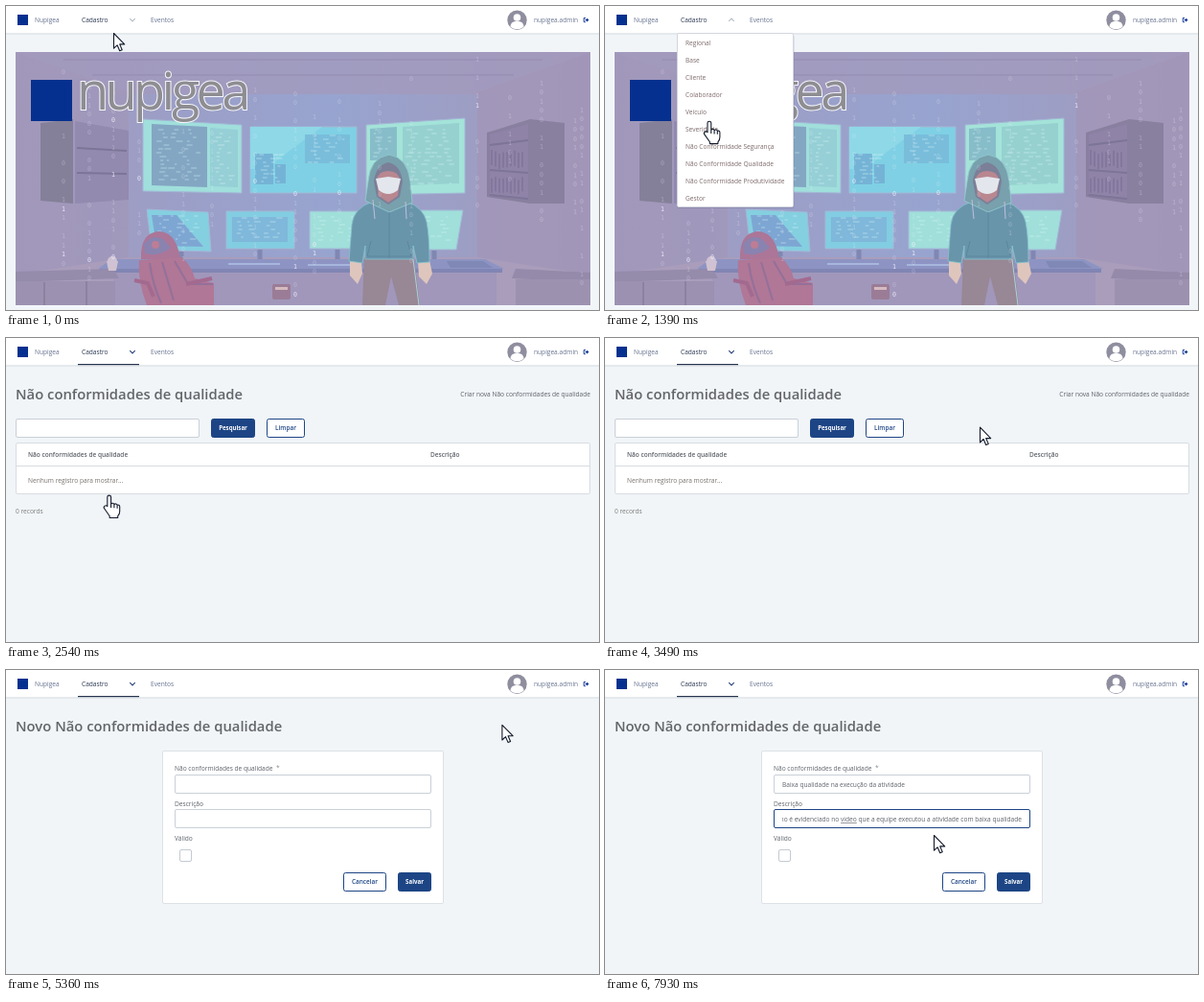
Animation of 619 by 317 pixels, one loop 8000 ms. Source, as an HTML page:

```html
<!DOCTYPE html>
<html lang="pt-BR">
<head>
<meta charset="utf-8">
<title>Cadastro</title>
<style>
  html, body { margin: 0; width: 100%; height: 100%; overflow: hidden; background: #f1f5f8; }
  svg { display: block; width: 619px; height: 317px; font-family: "Open Sans", "Noto Sans", sans-serif; }
  .digits { font-family: "DejaVu Sans Mono", monospace; }
</style>
</head>
<body>
<svg id="stage" viewBox="0 0 619 317"></svg>
<script>
const LOOP = 8000;
const NAVY = '#1d4585', INK = '#5d6269', BRAND = '#06308f';

let seed = 11;
const rnd = () => (seed = (seed * 16807) % 2147483647) / 2147483647;

const attrs = o => Object.entries(o).map(([k, v]) => `${k}="${v}"`).join(' ');
const text = (x, y, s, o = {}) =>
  `<text ${attrs({ x, y, 'font-size': 6.6, fill: INK, ...o })}>${s}</text>`;
const box = (x, y, w, h, fill, o = {}) =>
  `<rect ${attrs({ x, y, width: w, height: h, fill, ...o })}/>`;
const frame = (x, y, w, h, stroke, o = {}) =>
  box(x + .5, y + .5, w - 1, h - 1, '#fff', { stroke, rx: 1.5, ...o });
const poly = (points, fill, o = {}) => `<polygon ${attrs({ points, fill, ...o })}/>`;
const path = (d, o = {}) => `<path ${attrs({ d, fill: 'none', ...o })}/>`;
const group = (id, s, o = {}) => `<g ${attrs({ id, ...o })}>${s}</g>`;
const button = (x, y, w, label, solid) =>
  frame(x, y, w, 20, NAVY, { fill: solid ? NAVY : '#fff', rx: 2 }) +
  text(x + w / 2, y + 12.4, label, {
    'text-anchor': 'middle', 'font-weight': solid ? 700 : 600,
    'font-size': solid ? 6.1 : 6.4, fill: solid ? '#fff' : NAVY
  });
const title = s => text(10, 64, s, { 'font-size': 14.8, 'font-weight': 600, fill: '#636569' });

// Short rows of fake code inside a screen
function codeLines(x, y, w, h) {
  let d = '';
  for (let row = y + 3; row < y + h - 2; row += 4) {
    for (let col = x + 3 + rnd() * 8; col < x + w - 9; col += 6 + rnd() * 18) {
      d += `M${col.toFixed(1)} ${row}h${(2 + rnd() * 5).toFixed(1)}`;
    }
  }
  return path(d, { stroke: '#d9f6f6', 'stroke-width': .9, opacity: .55 });
}

const monitor = (points, fill) =>
  poly(points, fill, { stroke: '#a3b8d6', 'stroke-linejoin': 'round' });

function binaryRain() {
  let s = '';
  for (const x of [58, 85, 110, 137, 183, 213, 258, 300, 320, 346, 388, 421, 490, 524, 557, 592, 599]) {
    const end = 190 + rnd() * 115;
    for (let y = 56 + rnd() * 70; y < end; y += 9.5) {
      if (rnd() < .7) {
        s += text(x, y.toFixed(1), rnd() < .5 ? 0 : 1,
          { opacity: rnd() < .1 ? .9 : .3, fill: '#f0effa' });
      }
    }
  }
  return group('rain', s, { class: 'digits' });
}

function banner() {
  let books = '';
  for (let i = 0; i < 9; i++) books += `M${507 + i * 4} ${150 + rnd() * 5}v16M${507 + i * 4} ${178 + rnd() * 4}v15`;
  return [
    box(10, 48, 600, 264, 'url(#wall)'),
    poly('10,48 610,48 505,92 120,92', '#a39abd', { opacity: .75 }),
    path('M60 56H560M90 72H530', { stroke: '#968eb2', 'stroke-width': 2, opacity: .6 }),
    poly('10,48 128,90 128,262 10,290', '#a198b9', { opacity: .7 }),
    poly('610,48 492,90 492,262 610,290', '#a397b8', { opacity: .8 }),
    poly('10,280 128,262 492,262 610,280 610,312 10,312', '#a99dbb'),
    // shelves
    poly('36,122 70,118 70,206 36,203', '#858099'),
    poly('72,120 128,130 128,202 72,206', '#938ab0'),
    poly('502,132 547,118 583,122 583,206 547,206 502,199', '#897f9f'),
    poly('505,134 545,123 545,202 505,196', '#8f83a8'),
    path('M74 148l52 3M74 174l52 1M505 145l40-5M505 171l40 3M505 197l40 4', { stroke: '#7d7598', 'stroke-width': 2 }),
    path(books, { stroke: '#807499', 'stroke-width': 1.5 }),
    // upper screens
    monitor('143,118 246,124 246,195 143,193', '#a0dfdc'),
    poly('152,123 210,126 210,189 152,187', '#83a6c3'),
    poly('213,127 242,129 242,189 213,188', '#96cfd6'),
    codeLines(154, 126, 54, 60), codeLines(213, 130, 30, 58),
    monitor('255,126 366,126 366,195 255,195', '#7fd0e4'),
    poly('255,126 330,126 270,170 255,170', '#8ed8e7'),
    box(260, 154, 19, 32, '#75b3d6'), box(281, 165, 11, 20, '#75b3d6'), box(312, 134, 47, 30, '#79bddb'),
    codeLines(258, 152, 38, 36), codeLines(312, 132, 48, 34),
    monitor('376,124 479,117 479,195 376,197', '#a4e3d9'),
    poly('380,128 408,126 408,160 380,161', '#87bdc9'), poly('414,126 473,122 473,185 414,187', '#96d1d0'),
    codeLines(380, 126, 28, 34), codeLines(414, 126, 58, 62),
    // lower screens
    monitor('147,212 211,215 214,256 152,254', '#84cfe0'),
    poly('152,218 178,218 206,251 157,250', '#7ea6d3'),
    codeLines(155, 216, 52, 36),
    monitor('230,214 301,214 301,253 230,253', '#82cde1'),
    box(236, 220, 58, 26, '#7fb8da'), codeLines(236, 218, 58, 28),
    monitor('317,214 374,214 374,253 317,253', '#a0dfda'),
    codeLines(320, 217, 50, 32),
    monitor('424,213 477,213 470,254 424,254', '#a0dfda'),
    codeLines(428, 217, 42, 32),
    path('M183 256v9M265 254v11M346 254v11M447 255v10', { stroke: '#8087b2', 'stroke-width': 5 }),
    // desks
    poly('110,264 500,264 520,274 96,274', '#8d94c3'),
    box(98, 274, 420, 4, '#8085b3'), box(112, 278, 400, 34, '#a197bb'),
    path('M232 269h54M315 270h44', { stroke: '#a7b6dc', 'stroke-width': 2 }),
    poly('10,277 112,274 118,284 10,288', '#958bab'), box(10, 287, 104, 25, '#9c91b1'),
    path('M40 288v24M84 287v25', { stroke: '#8c829f', 'stroke-width': 2 }),
    poly('532,274 610,278 610,288 528,284', '#958aaa'), box(532, 285, 78, 27, '#9d91b0'),
    poly('460,266 498,266 508,273 464,273', '#8088b6'),
    poly('105,266 117,266 115,276 107,276', '#d2c2d0'), '<circle cx="111" cy="266" r="5" fill="#cfc2d4"/>',
    box(278, 290, 19, 16, '#9b7c97', { rx: 2 }), box(281, 293, 13, 3, '#d5bbbf'),
    // chair
    path('M141 264q-1-28 19-29q18 1 22 29z', { fill: '#ab7698' }),
    path('M144 249q7-12 20-6l8 9q-12 10-27 6z', { fill: '#8a83b0' }),
    '<circle cx="156" cy="249" r="4" fill="#bd7d95"/>',
    path('M139 265l45-3q10 10 13 22l20 5v23h-70q-10-26-8-47z', { fill: '#b07796' }),
    path('M150 268q3 22 12 42M163 267l12 40M176 266l14 24h26', { stroke: '#94709a', 'stroke-width': 2 }),
    path('M134 286l14 3 6 14M188 290l27-6', { stroke: '#a36a90', 'stroke-width': 4 }),
    // hooded figure
    path('M374 262h52l6 50h-22l-8-30-6 30h-24z', { fill: '#988795' }),
    path('M425 264l6 48', { stroke: '#a9d5dc' }),
    path('M359 265l12 1 1 13-5 11-8-9zM430 266l12-1 3 14-6 11-8-8z', { fill: '#dfc6bd' }),
    path('M383 204q-20 6-22 24l-3 38 14 2 3-18v14h50v-14l4 18 13-1q0-28-3-42q-3-14-20-21z',
      { fill: '#6995ab', stroke: '#86c5cd', 'stroke-width': .8 }),
    path('M400 155q-20 3-22 28l-3 20 25 12 24-10-2-22q-3-25-22-28z', { fill: '#78a0ad', stroke: '#92cdd1', 'stroke-width': .8 }),
    path('M399 163q-13 3-15 20l3 16 12 8 12-8 3-16q-2-17-15-20z', { fill: '#7b7f98' }),
    path('M387 182q1-10 12-10t12 10l-2 16-10 7-10-7z', { fill: '#b98790' }),
    path('M386 180l13-2 13 2-3 12q-10 8-20 0z', { fill: '#e3e7ed' }),
    path('M400 215v48M381 245l-4 16h46l-4-16', { stroke: '#5c869e' }),
    path('M383 202l2 20M417 204l1 18', { stroke: '#bfc0dc' }),
    binaryRain(),
    box(26, 77, 43, 43, BRAND),
    text(74, 108, 'nupigea', {
      'font-size': 54, 'letter-spacing': -3.6, fill: '#8d8d92', stroke: '#f7f7fb',
      'stroke-width': 2, 'paint-order': 'stroke'
    })
  ].join('');
}

const nav = () => [
  box(0, 28, 619, 2, '#dfe4e9', { opacity: .7 }), box(0, 0, 619, 28, '#fff'),
  box(12, 9, 11, 11, BRAND),
  text(30, 17.2, 'Nupigea', { fill: '#66728f' }),
  text(79, 17.2, 'Cadastro', { fill: '#26344f' }),
  text(151, 17.2, 'Eventos', { fill: '#66728f' }),
  box(75, 27, 64, 1.2, '#26344f', { id: 'underline' }),
  path('M-2.7-1.4L0 1.4L2.7-1.4', { id: 'chevron', 'stroke-width': 1.1 }),
  '<circle cx="533.5" cy="14.8" r="10.2" fill="#8e8e9f"/><circle cx="533.5" cy="12" r="3.8" fill="#fff"/>',
  path('M526.5 21.8q0-6 7-6t7 6q-7 5-14 0z', { fill: '#fff' }),
  text(551, 17.2, 'nupigea.admin', { fill: '#66728f' }),
  path('M605 12.5h-1.8v4.2h1.8', { stroke: BRAND, 'stroke-width': .9 }),
  path('M604.6 14h1.6v-1.5l2.3 2.1-2.3 2.1v-1.5h-1.6z', { fill: BRAND })
].join('');

const MENU = ['Regional', 'Base', 'Cliente', 'Colaborador', 'Veículo', 'Severidade',
  'Não Conformidade Segurança', 'Não Conformidade Qualidade', 'Não Conformidade Produtividade', 'Gestor'];
const menu = () => box(75, 30, 122.5, 181, '#5c5c80', { opacity: .25, rx: 2 }) +
  frame(75, 28, 122, 182, '#d3d5de') +
  MENU.map((s, i) => text(84, 41 + 18 * i, s, { fill: '#7d696a' })).join('');

const HEAD = { 'font-size': 6.5, 'font-weight': 600 };
const list = () => [
  title('Não conformidades de qualidade'),
  text(610, 61, 'Criar nova Não conformidades de qualidade', { 'text-anchor': 'end' }),
  frame(10, 84, 192, 20, '#c9d0d8'),
  button(214, 84, 46, 'Pesquisar', true), button(272, 84, 40, 'Limpar'),
  frame(10, 109, 600, 54, '#d8dde2'), box(10, 133, 600, 1, '#d8dde2'),
  text(23, 124, 'Não conformidades de qualidade', HEAD), text(443, 124, 'Descrição', HEAD),
  text(23, 151, 'Nenhum registro para mostrar...', { fill: '#77706b' }),
  text(10, 183, '0 records', { fill: '#7d7c7a' })
].join('');

const form = () => [
  title('Novo Não conformidades de qualidade'),
  frame(163, 84, 294, 160, '#dce1e6'),
  text(176, 105, 'Não conformidades de qualidade'), text(282, 104, '*', { fill: '#8a8f96' }),
  frame(176, 109, 268, 20, '#c9d0d8', { id: 'nameField' }),
  text(185, 122, 'Baixa qualidade na execução da atividade', { id: 'nameText' }),
  text(176, 142, 'Descrição'),
  frame(176, 145, 268, 20, '#c9d0d8', { id: 'noteField' }),
  group('noteText', text(435, 158, 'Como é evidenciado no <tspan text-decoration="underline">video</tspan> que a equipe executou a atividade com baixa qualidade',
    { 'text-anchor': 'end' }), { 'clip-path': 'url(#noteClip)' }),
  box(0, 0, .8, 10, '#222', { id: 'caret' }),
  text(176, 178, 'Válido'),
  frame(181, 187, 13, 13, '#c3cad2'),
  button(352, 211, 45, 'Cancelar'), button(409, 211, 35, 'Salvar', true)
].join('');

const OUTLINE = { stroke: '#131a2b', fill: '#fff', 'stroke-width': 1.1, 'stroke-linejoin': 'round' };
const pointers =
  path('M.5.5V16.2l3.6-3.4 2.6 6 2.5-1.1-2.5-5.8h5z', { id: 'arrow', ...OUTLINE }) +
  path('M-1.2 2a1.9 1.9 0 0 1 3.8 0v7a1.9 1.9 0 0 1 3.3.5a1.9 1.9 0 0 1 3.2.8a1.7 1.7 0 0 1 2.6 1.4v5q0 3-2 5v1.8h-8.5v-1.8l-5.6-7.9a1.8 1.8 0 0 1 3.2-2.2zM2.6 9v4M5.9 9.5v3.8M9.1 10.3v3.4',
    { id: 'hand', ...OUTLINE }) +
  path('M-3-8h2.2L0-7.4L.8-8H3M-3 8h2.2L0 7.4L.8 8H3M0-7.4V7.4', { id: 'beam', stroke: '#111', 'stroke-width': 1.2 });

const stage = document.getElementById('stage');
stage.innerHTML = `<defs>
  <linearGradient id="wall"><stop stop-color="#a299bd"/><stop offset=".3" stop-color="#9b9fc8"/>
  <stop offset=".55" stop-color="#97a4cf"/><stop offset="1" stop-color="#a398ba"/></linearGradient>
  <clipPath id="noteClip"><rect x="185" y="148" width="256" height="14"/></clipPath></defs>` +
  group('home', banner()) + group('list', list()) + group('form', form()) + nav() + group('menu', menu()) +
  '<circle id="ring" r="12" fill="#777" opacity=".25"/>' + group('pointer', pointers);

const el = id => document.getElementById(id);
const show = (id, on) => el(id).setAttribute('display', on ? 'inline' : 'none');
const set = (id, key, value) => el(id).setAttribute(key, value);
const within = (t, a, b) => t >= a && t < b;
const ease = u => u * u * (3 - 2 * u);

// Progress 0..1 in n visible steps, the first one at a, the last one at b
function stepped(t, a, b, n) {
  if (t < a) return 0;
  return Math.min(1, (Math.floor((t - a) / (b - a) * (n - 1) + 1e-6) + 1) / n);
}

// start, end, steps, x, y
const MOVES = [
  [70, 230, 3, 111, 18],
  [920, 1700, 11, 107, 164],
  [2940, 3730, 11, 513, 62],
  [3800, 4270, 7, 522, 55],
  [5300, 5990, 10, 357, 119]
];
const CLICKS = [[1930, 2010], [4500, 4580], [6370, 6520]];

function pointerAt(t) {
  if (t >= 7860) return [343, 172];
  let x = 112, y = 28;
  for (const [a, b, n, toX, toY] of MOVES) {
    const u = ease(stepped(t, a, b, n));
    x += (toX - x) * u;
    y += (toY - y) * u;
  }
  return [x, y];
}

function pointerKind(t, y) {
  if (within(t, 920, 2940)) return y > 31 ? 'hand' : 'arrow';
  if (within(t, 3800, 5300)) return 'hand';
  if (within(t, 5300, 7230)) return y > 109 ? 'beam' : 'arrow';
  return within(t, 7230, 7860) ? '' : 'arrow';
}

function render(t) {
  const [x, y] = pointerAt(t), kind = pointerKind(t, y);
  show('home', t < 2540);
  show('list', within(t, 2540, 5050));
  show('form', t >= 5050);

  const hover = t < 2540 ? (y > 29 ? 0 : stepped(t, 70, 230, 3)) : 1;
  set('underline', 'opacity', hover);
  set('chevron', 'stroke', hover > .5 ? '#26407a' : '#b4bac6');
  const turn = t < 2540 ? 180 * stepped(t, 460, 690, 4) : 0;
  set('chevron', 'transform', `translate(132 14.5) rotate(${turn})`);

  const open = stepped(t, 460, 610, 3);
  show('menu', within(t, 460, 2540));
  set('menu', 'opacity', open);
  set('menu', 'transform', `translate(0 ${4 * (1 - open)})`);

  const onName = within(t, 6370, 7230), onNote = t >= 7230;
  set('nameField', 'stroke', onName ? NAVY : '#c9d0d8');
  set('noteField', 'stroke', onNote ? NAVY : '#c9d0d8');
  show('nameText', t >= 6680);
  show('noteText', t >= 7320);
  show('caret', within(t, 6370, 7930));
  set('caret', 'x', onNote ? (t < 7320 ? 185 : 435) : (t < 6680 ? 185 : 313.5));
  set('caret', 'y', onNote ? 150 : 114);

  for (const id of ['arrow', 'hand', 'beam']) show(id, id === kind);
  set('pointer', 'transform', `translate(${x.toFixed(1)} ${y.toFixed(1)})`);
  show('ring', CLICKS.some(([a, b]) => within(t, a, b)));
  set('ring', 'cx', x);
  set('ring', 'cy', y);
}

const begin = performance.now();
function tick() {
  render((performance.now() - begin) % LOOP);
  requestAnimationFrame(tick);
}
tick();
</script>
</body>
</html>
```
